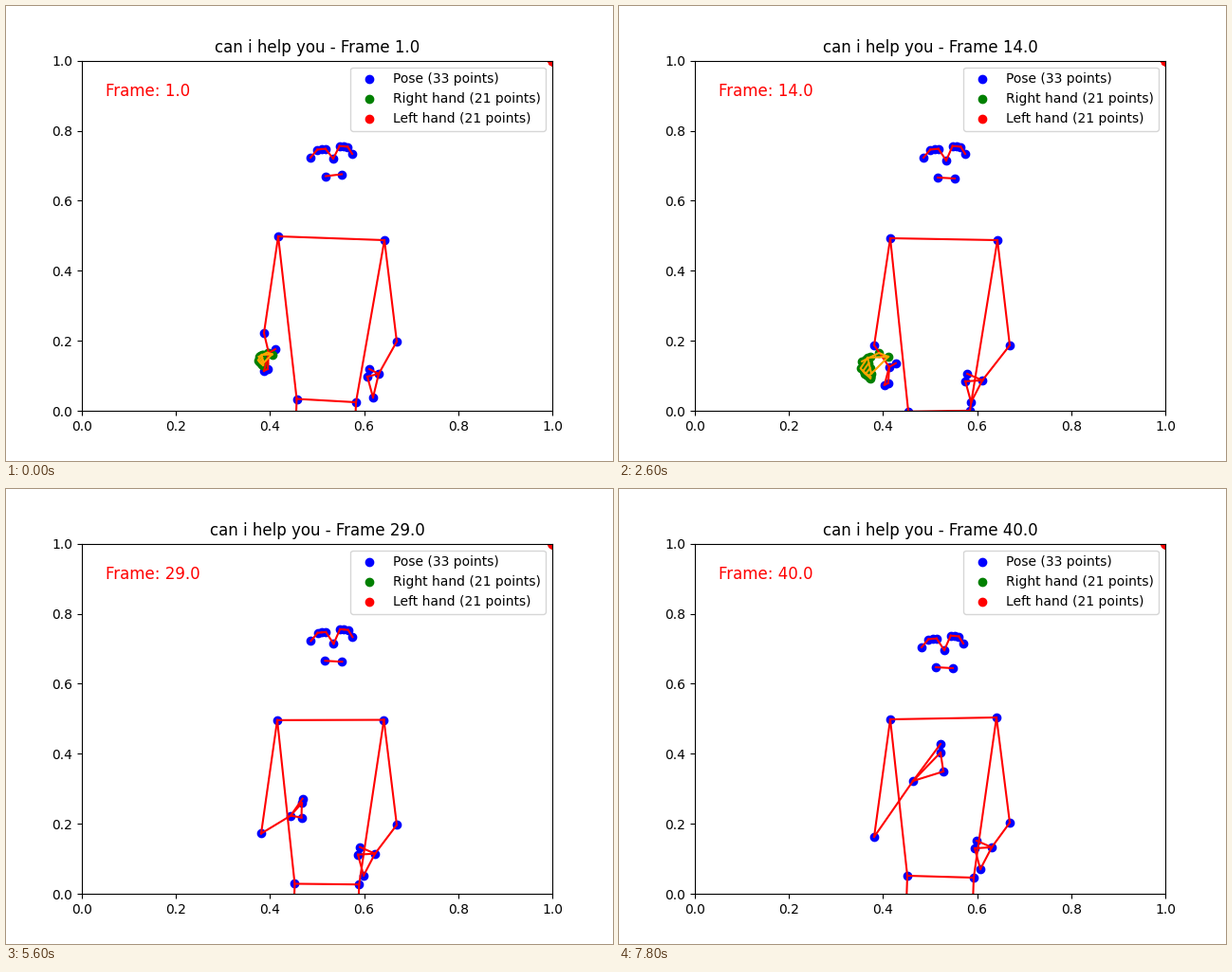
Write a matplotlib script that moves like this. It is 640 px wide and 480 px high and loops after 8000 ms.

```python
import numpy as np
import matplotlib.pyplot as plt
from matplotlib.animation import FuncAnimation

FRAMES, INTERVAL = 40, 200

# Points are complex numbers in stage pixels, y pointing down.
REST = {
    "nose": 345 + 163j, "eye_l": 356 + 148j, "eye_r": 332.5 + 151j,
    "ear_l": 365 + 156j, "ear_r": 321 + 160j,
    "mouth_l": 354 + 182j, "mouth_r": 336 + 181j,
    "shoulder_l": 399 + 247j, "shoulder_r": 286 + 245j,
    "elbow_l": 412 + 358j, "elbow_r": 269 + 358j,
    "hip_l": 370 + 427j, "hip_r": 305 + 428j,
    "wrist_l": 383 + 395j, "pinky_l": 371 + 418j,
    "index_l": 365 + 396j, "thumb_l": 367 + 388j,
    "wrist_r": 285 + 381j, "pinky_r": 280 + 400j,
    "index_r": 284 + 398j, "thumb_r": 292 + 377j,
}
GROUPS = {
    "head": list(REST)[:7],
    "fingers_l": ["pinky_l", "index_l", "thumb_l"],
    "hand_l": ["wrist_l", "pinky_l", "index_l", "thumb_l"],
    "hand_r": ["wrist_r", "pinky_r", "index_r", "thumb_r"],
}

# How far each movement carries a joint or group away from rest.
SETTLE = {"hip_r": 1.5 - 13.5j, "hip_l": -1 - 9j, "shoulder_r": 1 - 2j,
          "elbow_r": 3 - 13j, "elbow_l": -4j, "wrist_l": 10 - 7j,
          "fingers_l": 16 - 5j, "hand_r": -8 - 15j,
          "nose": -2j, "mouth_l": -4.5j, "mouth_r": 1 - 1.5j}
SWEEP = {"wrist_r": 15 + 5j, "pinky_r": 35 + 9j, "index_r": 37 - 9j,
         "thumb_r": 27 + 10j, "elbow_r": 1 + 4j, "elbow_l": 1 + 2j}
RISE = {"hip_r": -1 - 20j, "hip_l": 4 - 17j, "shoulder_l": -1 - 6j,
        "shoulder_r": -2j}
BOB = {"head": 1 - 1.5j}
LIFT = {"wrist_r": 25 - 60j, "pinky_r": 52 - 88j, "index_r": 46 - 110j,
        "thumb_r": 34 - 83j, "hand_l": 10 - 17j, "elbow_r": 9j,
        "elbow_l": -6j, "head": 1.5j}
NOD = {"head": -2 + 5.5j, "wrist_r": -13j, "pinky_r": 10 - 14j,
       "index_r": 9 - 10j, "thumb_r": 13 - 25j}

SIDE_LINKS = ["eye_in eye", "eye eye_out", "eye_out ear", "shoulder elbow",
              "elbow wrist", "wrist pinky", "wrist index", "wrist thumb",
              "pinky index", "shoulder hip", "hip knee"]
LINKS = [tuple(f"{name}_{side}" for name in link.split())
         for side in "lr" for link in SIDE_LINKS]
LINKS += [(f"{name}_l", f"{name}_r") for name in ("mouth", "shoulder", "hip")]
LINKS += [("nose", "eye_in_l"), ("nose", "eye_in_r")]

# Right hand: palm root, then base and tip of thumb, index and pinky.
FIST = np.array([-1 - 11j, -11 - 15j, -29 - 6j, -23 - 10j, -20 + 10j, -19 + 7j, -20 + 12j])
OPEN = np.array([-1 + 2j, 10 - 4j, 41 - 7j, 23 - 5j, 51 + 25j, 5 + 27j, 24 + 38j])
KNUCKLES = np.array([0, 0.5, 0.8, 1])
HAND_PATHS = [[0, 1, 2, 3, 4], [0, 5, 9, 13, 17, 0]]
HAND_PATHS += [list(range(k, k + 4)) for k in (5, 9, 13, 17)]
SEEN = [(1, 3), (11, 15), (18, 21), (34, 35)]  # when the hand is detected


def ramp(t, start, end):
    return np.clip((t - start) / (end - start), 0, 1)


def ease(t, start, end):
    s = ramp(t, start, end)
    return s * s * (3 - 2 * s)


def bump(t, start, end):
    return np.sin(np.pi * ramp(t, start, end)) ** 2


def settle(t):
    return np.exp(-(t - 1) / 3)


def body_at(t):
    joints = dict(REST)
    moves = [(settle(t), SETTLE), (bump(t, 14, 25), SWEEP),
             (ramp(t, 14, 40), RISE), (bump(t, 19, 32), BOB),
             (ease(t, 25, 32), LIFT), (ease(t, 32, 40), NOD)]
    for weight, shifts in moves:
        for name, shift in shifts.items():
            for joint in GROUPS.get(name, [name]):
                joints[joint] += weight * shift
    for side, sign in (("l", -1), ("r", 1)):
        joints[f"eye_in_{side}"] = joints[f"eye_{side}"] + sign * 4.3 - 0.3j
        joints[f"eye_out_{side}"] = joints[f"eye_{side}"] - sign * 4.3 + 0.5j
        joints[f"knee_{side}"] = joints[f"hip_{side}"] - 4 + 115j
    return joints


def hand_at(t, wrist):
    """The small fist grows, opens in the sweep and turns up with the lift."""
    s, spread = settle(t), ease(t, 14, 19)
    fist = FIST * (1 - 0.5 * s) + s * (4 + 7j)
    pose = fist + (OPEN - fist) * spread
    pose = wrist + pose * np.exp(-0.9j * ease(t, 25, 32))
    root, thumb, thumb_tip, *corners = pose
    bases = [thumb, *np.linspace(corners[0], corners[2], 4)]
    tips = [thumb_tip, *np.linspace(corners[1], corners[3], 4)]
    points = [root]
    for base, tip in zip(bases, tips):
        reach = tip - base
        curl = 0.45j * (1 - spread) * np.sin(np.pi * KNUCKLES)
        curl = curl * (base != thumb)
        points.extend(base + reach * (KNUCKLES + curl))
    return np.array(points)


def to_data(points):
    points = np.asarray(points)
    return np.column_stack([(points.real - 80) / 496,
                            (427.2 - points.imag) / 369.6])


fig, ax = plt.subplots(figsize=(6.4, 4.8), dpi=100)
ax.set(xlim=(0, 1), ylim=(0, 1))
pose_dots = ax.scatter([], [], c="blue", label="Pose (33 points)")
right_dots = ax.scatter([], [], c="green", label="Right hand (21 points)")
ax.scatter(np.ones(21), np.ones(21), c="red", label="Left hand (21 points)")
bones = [ax.plot([], [], color="red")[0] for _ in LINKS]
fingers = [ax.plot([], [], color="orange")[0] for _ in HAND_PATHS]
label = ax.text(0.05, 0.9, "", fontsize=12, color="red")
title = ax.set_title("")
ax.legend(loc="upper right")


def draw(i):
    t = i + 1
    joints = body_at(t)
    pose_dots.set_offsets(to_data(list(joints.values())))
    for bone, (a, b) in zip(bones, LINKS):
        bone.set_data(*to_data([joints[a], joints[b]]).T)

    # An undetected hand collapses into the corner.
    seen = any(a <= t <= b for a, b in SEEN)
    hand = to_data(hand_at(t, joints["wrist_r"])) if seen else np.ones((21, 2))
    right_dots.set_offsets(hand)
    for finger, path in zip(fingers, HAND_PATHS):
        finger.set_data(*hand[path].T)

    label.set_text(f"Frame: {t:.1f}")
    title.set_text(f"can i help you - Frame {t:.1f}")
    return [pose_dots, right_dots, *bones, *fingers, label, title]


anim = FuncAnimation(fig, draw, frames=FRAMES, interval=INTERVAL,
                     repeat=True, repeat_delay=0, blit=False)
plt.show()
```
